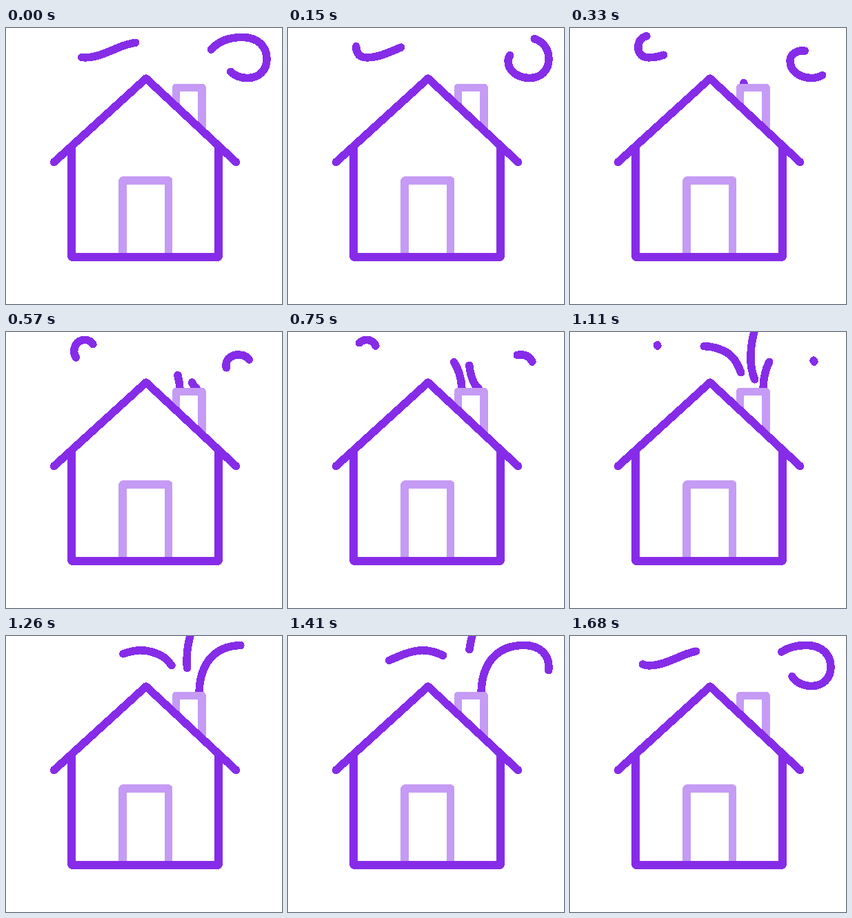
These frames come from a looping animation (400 px wide and 400 px high, 1710 ms). An HTML page:

```html
<!DOCTYPE html>
<html lang="en">
<head>
<meta charset="utf-8">
<title>House with chimney smoke</title>
<style>
  html, body { margin: 0; width: 100%; height: 100%; overflow: hidden; background: #fff; }
  svg { display: block; width: 100vw; height: 100vh; shape-rendering: crispEdges; }
  path { fill: none; stroke: #862ce8; stroke-width: 11.5; stroke-linejoin: round; stroke-linecap: round; }
  .light { stroke: #c59bf5; stroke-linecap: butt; }
</style>
</head>
<body>
<svg viewBox="0 0 400 400">
  <g id="smoke"></g>
  <path class="light" d="M246.5 113V86.5H284V148"/>
  <path class="light" d="M169 330V221H235.5V330"/>
  <path d="M95 174V332H308V174"/>
  <path d="M69.5 194.5L203 73L333.5 194.5"/>
</svg>
<script>
const LOOP = 1710, STEP = 30;
const PERIOD = 1650;  // a new puff follows the last one after this time
const LAG = 500;      // the tail of a stroke trails its head
const DOT = .5;       // shortest visible stroke

// ease: the two x handles of a cubic curve with flat ends
const puffs = [
  { start: 180, end: 2365, ease: [1 / 3, 2 / 3],
    d: 'M252 83C251 58 240 32 217 25C196 17 182 22 169 26C151 33 129 45 110 42.5' +
       'C95 40 95 16 110 12C118 10 125 14 127 20' },
  { start: 365, end: 1440, ease: [1 / 3, 2 / 3],
    d: 'M277 83C265 73 258 44 264.5 10C267 0 270 -15 280 -42' },
  { start: 870, end: 2450, ease: [.27, .235],
    d: 'M280 82C281 38 304 13 343 13.5C364 13.5 378 26 378 45C378 62 366 72.5 350 72.5' +
       'C333 72.5 319 62 319 48C319 38 328 32.5 338 33C346 33 351 37 354 43' }
];

function ease(x, [a, b]) {
  if (x <= 0) return 0;
  if (x >= 1) return 1;
  let lo = 0, hi = 1, u;
  for (let i = 0; i < 24; i++) {
    u = (lo + hi) / 2;
    const v = 1 - u;
    if (3 * v * v * u * a + 3 * v * u * u * b + u * u * u < x) lo = u; else hi = u;
  }
  return u * u * (3 - 2 * u);
}

function addPath(d) {
  const path = document.createElementNS('http://www.w3.org/2000/svg', 'path');
  path.setAttribute('d', d);
  document.getElementById('smoke').append(path);
  return path;
}

// Each puff is drawn twice: the new one and the rest of the one before
const strokes = puffs.flatMap(puff => [0, PERIOD].map(delay => {
  const path = addPath(puff.d);
  return { ...puff, delay, path, length: path.getTotalLength() };
}));

function draw(time) {
  for (const s of strokes) {
    const at = t => s.length * ease((t - s.start) / (s.end - s.start), s.ease);
    const head = at(time + s.delay), tail = at(time + s.delay - LAG);
    const from = Math.min(tail, s.length - DOT);
    s.path.style.display = head > 0 && tail < s.length ? '' : 'none';
    s.path.style.strokeDasharray = `${Math.max(head - from, DOT)} 2000`;
    s.path.style.strokeDashoffset = -from;
  }
}

const begin = performance.now();
function frame() {
  const time = (performance.now() - begin) % LOOP;
  draw(Math.floor(time / STEP) * STEP);
  requestAnimationFrame(frame);
}
frame();
</script>
</body>
</html>
```
